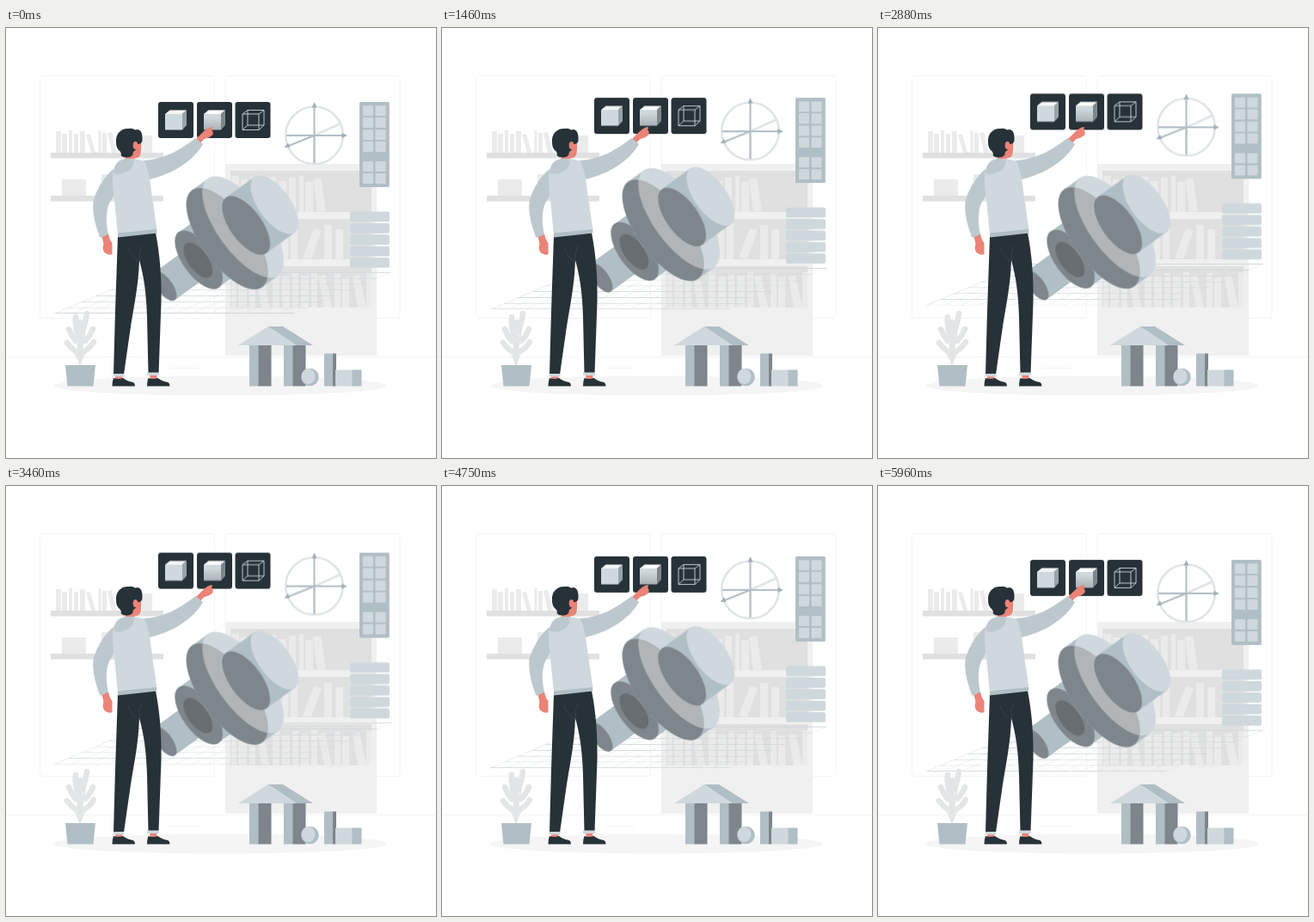
Animation, 500 px wide and 500 px high, one loop 6 s. Source, as an HTML page without scripts:

```html
<!DOCTYPE html>
<html lang="en">
<head>
<meta charset="utf-8">
<title>3D modeling</title>
<style>
  html, body { margin: 0; width: 100%; height: 100%; overflow: hidden; background: #fff; }
  svg { display: block; width: 100%; height: 100%; }
  .panel { animation: lift 6s linear infinite; }
  .bolt { animation: lift 3s linear infinite; }
  @keyframes lift {
    0%, 100% { transform: translateY(0); }
    50% { transform: translateY(-10px); }
  }
  .pale { fill: #cfd8dc; }
  .mid { fill: #b0bec5; }
  .gray { fill: #7f868b; }
  .ink { fill: #263238; }
  .skin { fill: #eb8377; }
  .book { fill: #ebebeb; }
  .wall { fill: #e0e0e0; }
  .line { fill: none; stroke: #cfd8dc; }
</style>
</head>
<body>
<svg viewBox="0 0 500 500">
  <defs>
    <linearGradient id="shade" x2="0" y2="1">
      <stop offset=".2" stop-color="#cfd8dc"/>
      <stop offset="1" stop-color="#aab2b6"/>
    </linearGradient>
    <pattern id="mesh" width="19.86" height="6.8" patternUnits="userSpaceOnUse">
      <path class="line" d="M0 0H19.86M0 0V6.8" stroke-width="1.3"/>
    </pattern>
    <clipPath id="rim"><ellipse cx="23" rx="29.5" ry="69.5"/></clipPath>
    <g id="cell"><rect width="12" height="12" rx="1"/><rect x="14.5" width="12" height="12" rx="1"/></g>
    <rect id="btn" x="400" width="46" height="11.8" rx="2"/>
    <rect id="tile" y="86" width="41" height="42" rx="3"/>
  </defs>

  <!-- room -->
  <g fill="none" stroke="#f4f4f4">
    <rect x="39.500" y="55.500" width="203" height="282" rx="3"/>
    <rect x="255" y="55.500" width="203" height="282" rx="3"/>
    <path d="M0 382.500H500M190 395.500h34"/>
  </g>
  <ellipse cx="249.500" cy="416" rx="193.500" ry="11.500" fill="#f5f5f5"/>

  <!-- wall shelves -->
  <path class="wall" d="M52 145h131v6.500H52zM52 195h131v6.500H52z"/>
  <path class="book" d="M58 145v-25h6v25zM65 145v-22h6v22zM73 145v-26h4v26zM79 145v-22h5v22zM86 145v-25h6v25zM99 145l-6-21 5-1 6 22zM107.500 145v-26h3v26zM112 145v-23h5v23zM123 145l-5-23 5-1 6 24zM158 125h12v20h-12zM65 176h28v19H65zM111 170h20v25h-20z"/>

  <!-- bookcase -->
  <path fill="#f0f0f0" d="M255 158h176v223H255z"/>
  <path class="wall" d="M261 166h164v48H261zM261 222h164v47H261zM261 277h164v48H261z"/>
  <path class="book" d="M262 214v-42h9v42zM273 214v-38h8v38zM284 214v-41h7v41zM294 214v-37h10v37zM307 214v-41h7v41zM317 214v-36h9v36zM329 214v-40h8v40zM341 214v-42h5v42zM348 214v-35h9v35zM362 214l-5-38 9-2 6 39z"/>
  <path class="book" d="M262 269v-40h9v40zM274 269v-36h8v36zM286 269v-40h8v40zM298 269v-36h9v36zM310 269v-41h8v41zM321 269v-35h7v35zM331 269v-42h8v42zM345 267l13-34 9 2-12 34zM370 269v-40h9v40zM383 269v-35h9v35z"/>
  <path class="book" d="M262 325v-38h6v38zM270 325v-41h10v41zM283 325v-36h7v36zM297 325l-5-35 8-2 6 37zM310 325v-41h8v41zM321 325v-36h9v36zM333 325v-40h7v40zM343 325v-37h9v37zM355 325v-41h7v41zM370 325l-7-36 8-2 8 38zM382 325v-40h7v40zM391 325v-35h8v35zM409 325l-6-36 8-2 8 38zM419 325v-41h6v41z"/>

  <!-- floating interface -->
  <g class="panel">
    <g transform="matrix(1 0 -2.374 1 170 284)">
      <path fill="url(#mesh)" d="M0 0h278v47.600H0z"/>
      <path class="line" d="M0 0h278v47.600H0z" stroke-width=".6"/>
    </g>
    <g class="ink">
      <use href="#tile" x="177"/><use href="#tile" x="222"/><use href="#tile" x="266.500"/>
    </g>
    <path class="pale" d="M185 100h20v18.500h-20z"/>
    <path fill="#f3f5f6" d="M185 100l5.500-4.500H210l-5 4.500z"/>
    <path fill="#98a2a7" d="M205 100l5-4.500V113l-5 5.500z"/>
    <path fill="url(#shade)" d="M230 100h20v18.500h-20z"/>
    <path fill="#fff" d="M230 100l5.500-4.500H255l-5 4.500z"/>
    <path fill="#7f868b" d="M250 100l5-4.500V113l-5 5.500z"/>
    <path class="line" d="M275 100h19v18.500h-19zM281 95.500h19V113h-19zM275 100l6-4.500M294 100l6-4.500M294 118.500l6-5.500M275 118.500l6-5.500" stroke-width=".9"/>

    <g fill="none" stroke="#dfe4e6" stroke-width="2.500">
      <circle cx="358.500" cy="124.800" r="33.300"/>
      <path d="M358.500 125v33M358.500 125h-33M358.500 125l31-14"/>
    </g>
    <path fill="none" stroke="#b0bec5" stroke-width="2" d="M358.500 90v35H393M358.500 125l-31 12.500M358.500 125v32M358.500 125H326" />
    <path fill="#9fb0b8" d="M358.500 86l3 6.500h-6zM397 125l-6.500 3v-6zM323.500 139l4.500-5.500 2.300 5.300z"/>

    <rect class="mid" x="411" y="86" width="34.800" height="99" rx="1.500"/>
    <g class="pale">
      <use href="#cell" x="415" y="90.300"/><use href="#cell" x="415" y="104"/>
      <use href="#cell" x="415" y="118.200"/><use href="#cell" x="415" y="132"/>
      <use href="#cell" x="415" y="155"/><use href="#cell" x="415" y="169"/>
      <use href="#btn" y="213.500"/><use href="#btn" y="227"/><use href="#btn" y="240.300"/>
      <use href="#btn" y="253.700"/><use href="#btn" y="267"/>
    </g>
  </g>

  <!-- bolt, laid out along its own axis -->
  <g class="bolt">
    <g transform="translate(257 245) rotate(-36)">
      <path class="mid" d="M-91-18H-40V22H-91z"/>
      <ellipse class="gray" cx="-91" cy="2" rx="9" ry="20"/>
      <path class="mid" d="M-41-39H0V40H-41z"/>
      <ellipse class="gray" cx="-41" cy=".5" rx="18.500" ry="40"/>
      <ellipse fill="#676d71" cx="-42" cy=".5" rx="11.500" ry="24"/>
      <path class="mid" d="M0-69.500H23V69.500H0z"/>
      <ellipse class="mid" rx="29.500" ry="69.500"/>
      <ellipse class="pale" cx="23" rx="29.500" ry="69.500"/>
      <ellipse class="gray" rx="29.500" ry="69.500"/>
      <ellipse fill="#b1b5b7" rx="29.500" ry="69.500" clip-path="url(#rim)"/>
      <path class="mid" d="M27-39.500H68V40.500H27z"/>
      <ellipse class="pale" cx="68" cy=".5" rx="18.600" ry="40"/>
      <ellipse class="gray" cx="27" cy=".5" rx="18.600" ry="40"/>
    </g>
  </g>

  <!-- plant -->
  <g fill="none" stroke="#e3e5e6" stroke-linecap="round">
    <path stroke-width="2" d="M86 392C86 375 82 360 80 340M86 392C87 375 92 355 94 335M86 392C84 380 76 372 72 368M86 392C88 380 96 372 100 368"/>
    <path stroke-width="6.500" d="M81 336q-1 9 2 19M94 332q-1 10-5 21M73 350q3 8 8 14M101 350q-3 8-9 14M71 366q4 6 10 10M102 365q-4 7-11 11M86 342q0 20 0 38"/>
  </g>
  <path class="mid" d="M69 392h35l-2.500 24.500h-30z"/>

  <!-- toy blocks -->
  <path class="mid" d="M283 369h11v47.500h-11zM323 369h11v47.500h-11z"/>
  <path class="gray" d="M293.500 369h15v47.500h-15zM333.500 369h15v47.500h-15z"/>
  <path class="pale" d="M270 369l35-22 33 22z"/>
  <path class="mid" d="M305 347h17l35 22h-19z"/>
  <circle class="mid" cx="353.500" cy="406" r="10.300"/>
  <ellipse class="pale" cx="351.500" cy="405" rx="8" ry="9"/>
  <path class="mid" d="M370 378.500h10.500v38H370zM402 397.500h11.500v19H402z"/>
  <path class="gray" d="M380 378.500h4v38h-4z"/>
  <path class="pale" d="M383 397.500h19.500v19H383z"/>

  <!-- man -->
  <path class="skin" d="M127 404h8l1 6h-9zM167 403h8l1 7h-8z"/>
  <path class="ink" d="M125 407q6 2 11 0 5 4 12 5 2 1 2 4.500h-26.500q0-6 1.500-9.500zM165.500 407q5 2 11 0 5 4 12 5 2 1 2 4.500H164q0-6 1.500-9.500z"/>
  <path class="ink" d="M130 242L174 238C179 264 181 290 180.500 318L177.500 402H165.500L164 336C163 306 160 288 155 270C154 302 148 326 144 354L137 403H125L127 330z"/>
  <path fill="none" stroke="#37474f" stroke-width=".8" d="M155 270q-1-9 3-17M155 271q-9-3-13-16"/>
  <path class="pale" d="M124.500 402h13v3.500h-13zM164 400.500h14v3.500h-14z"/>
  <path class="skin" d="M111 240l8-1q1 7 4.500 11v13q-4 2-9-2-3-4-1-10zM221 129l8-8q5-5 10-6 2 1 0 3 2 2 1.500 6-4 4-10 5l-5 5z"/>
  <path fill="#bdc8ce" d="M127 163C116 169 105 188 101.500 202C100 217 105 232 109.500 244L119 240C116 226 116 213 120 204L128 190z"/>
  <path fill="#bdc8ce" d="M160 154C183 153 203 142 220.500 128L229 135C218 154 196 169 167 176z"/>
  <path class="skin" d="M140 145l10 1-1 10q-6 3-11-1zM148 130h9q1 11-1 18-3 4-8 3z"/>
  <path class="pale" d="M132 154Q145 150 160 154.500Q164 158 167 176L175.500 235L130 240L124 180Q123 160 132 154z"/>
  <path class="mid" d="M130 238.500l45-4.500.5 4.500-45.500 5z"/>
  <path fill="#bdc8ce" d="M125 168Q127 155 138 152Q146 151 149 155Q148 165 136 169Q128 171 125 168z"/>
  <path class="ink" d="M128 133C127 122 135 116 143 117Q147 116 150 118.500C156 116 159 122 158.500 129Q159 135 153 135Q152 142 148 144Q148 150 141 150.500Q136 151 133.500 148Q135 145 131 142Q128 139 128 133z"/>
  <ellipse class="skin" cx="150.500" cy="136.500" rx="2.800" ry="4.500"/>
</svg>
</body>
</html>
```
